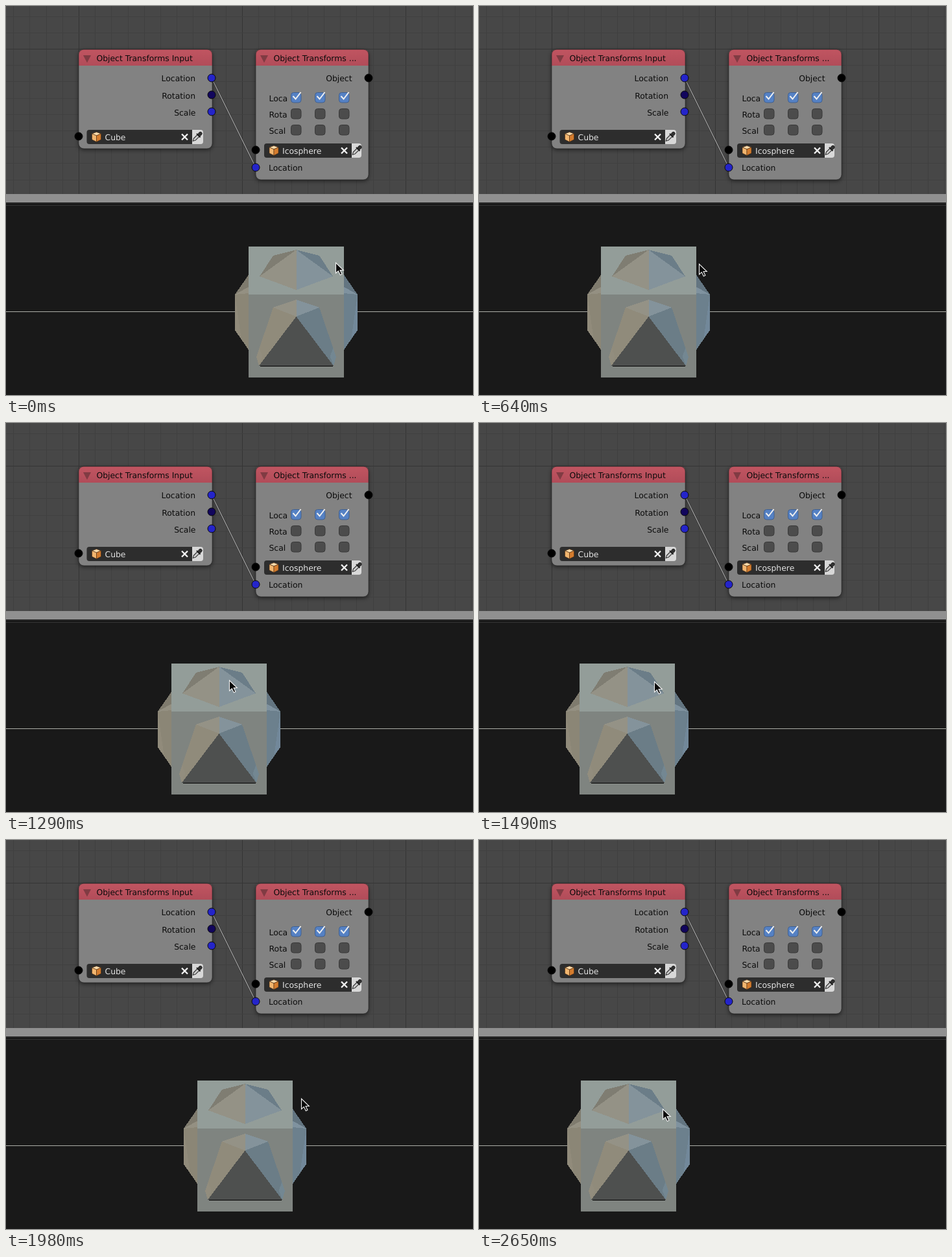
Write an HTML page that moves like this. It is 720 px wide and 600 px high and loops after 2750 ms.

```html
<!DOCTYPE html>
<html lang="en">
<head>
<meta charset="utf-8">
<title>Object transforms</title>
<style>
html, body { margin: 0; width: 100%; height: 100%; overflow: hidden; background: #191919; }
svg { display: block; width: 720px; height: 600px; }
text { font: 12.4px "DejaVu Sans", sans-serif; text-rendering: geometricPrecision; fill: #0b0b0b; }
.end { text-anchor: end; }
.field { fill: #e2e2e2; }
</style>
</head>
<body>
<svg id="stage" viewBox="0 0 720 600">
  <defs>
    <linearGradient id="head" x2="0" y2="1">
      <stop stop-color="#c15561"/><stop offset="1" stop-color="#b14c59"/>
    </linearGradient>
    <filter id="soft" x="-20%" y="-20%" width="140%" height="140%"><feGaussianBlur stdDeviation="3"/></filter>
  </defs>
  <rect width="720" height="290" fill="#474747"/>
  <g id="grid" shape-rendering="crispEdges"></g>
  <path d="M317 111L385 249" stroke="#2c2c2c" stroke-opacity=".5" stroke-width="2.6"/>
  <path d="M317 111L385 249" stroke="#bdbdbd"/>
  <g id="nodes"></g>
  <g shape-rendering="crispEdges">
    <rect y="290" width="720" height="310" fill="#191919"/>
    <rect y="290" width="720" height="13" fill="#909090"/>
    <rect y="303" width="720" height="3" fill="#222"/>
    <rect y="306" width="720" height="1" fill="#090909"/>
    <rect y="307" width="720" height="1" fill="#3b3b3b"/>
    <rect y="471" width="720" height="1" fill="#acada7"/>
    <g id="solid"></g>
  </g>
  <path id="pointer" d="M0 0V16L3.8 12.6L6.8 18.8L9.4 17.5L6.6 11.5H11.8Z"
        fill="#080808" stroke="#f2f2f2" stroke-width="1.1"/>
</svg>
<script>
const $ = id => document.getElementById(id);
const put = (id, markup) => $(id).insertAdjacentHTML('beforeend', markup);

// Node editor
function drawGrid() {
  const lines = (from, to, origin, path) => {
    for (let p = from; p < to; p += 25.2) {
      const major = Math.round((p - origin) / 25.2) % 10 === 0;
      put('grid', `<path d="${path(Math.round(p) + .5)}" stroke="${major ? '#353535' : '#404040'}"/>`);
    }
  };
  lines(112 - 25.2 * 4, 720, 112, p => `M${p} 0V290`);
  lines(66 - 25.2 * 2, 290, 66, p => `M0 ${p}H720`);
}

const text = (x, y, s, cls = '') => `<text x="${x}" y="${y}" class="${cls}">${s}</text>`;
const socket = (x, y, fill) => `<circle cx="${x}" cy="${y}" r="6" fill="${fill}" stroke="#080808"/>`;

const panel = (x, w, h, title) => `
  <rect x="${x}" y="69" width="${w}" height="${h}" rx="8" fill="#000" opacity=".55" filter="url(#soft)"/>
  <rect x="${x}" y="67" width="${w}" height="${h}" rx="8" fill="#828282"/>
  <path d="M${x} 92V75q0 -8 8 -8h${w - 16}q8 0 8 8V92Z" fill="url(#head)"/>
  <rect x="${x}" y="67" width="${w}" height="${h}" rx="8" fill="none" stroke="#272727" stroke-opacity=".6"/>
  <path d="M${x + 7} 76h12l-6 11.5Z" fill="#803b43"/>
  ${text(x + 27.4, 85, title)}`;

const cubeIcon = (x, y) => `<g transform="translate(${x} ${y})" stroke="#4b2c13" stroke-width=".6">
  <path d="M0 -7.5L7 -5L0 -2L-7 -5Z" fill="#ffdcab"/>
  <path d="M-7 -5L0 -2V7.5L-7 4Z" fill="#f2b66f"/>
  <path d="M7 -5L0 -2V7.5L7 4Z" fill="#d47c2e"/></g>`;

const cross = (x, y) => `<path d="M${x - 4.5} ${y - 4.5}l9 9m0 -9l-9 9" stroke="#f4f4f4" stroke-width="2.3"/>`;

const dropper = (x, y) => `<g transform="translate(${x} ${y}) rotate(45)" stroke="#222">
  <path d="M-2 -2V6L0 9.5L2 6V-2Z" fill="#c8c8c8"/>
  <rect x="-4" y="-3.5" width="8" height="2" fill="#222" stroke="none"/>
  <rect x="-2.3" y="-9" width="4.6" height="6" rx="2" fill="#333"/></g>`;

const picker = (x, y, w, tail, name) => `
  <path d="M${x + w} ${y}h${tail - 4}q4 0 4 4v14q0 4 -4 4h${4 - tail}Z" fill="#d8d8d8"/>
  <path d="M${x + w} ${y}H${x + 4}q-4 0 -4 4v14q0 4 4 4H${x + w}Z" fill="#2d2d2d"/>
  ${cubeIcon(x + 15, y + 11)}${text(x + 28, y + 16, name, 'field')}
  ${cross(x + w - 11.5, y + 11)}${dropper(x + w + 8, y + 10.5)}`;

const checkbox = (x, y, on) => `
  <rect x="${x + .5}" y="${y + .5}" width="15.5" height="15.5" rx="4"
        fill="${on ? '#5581c4' : '#4c4c4c'}" stroke="${on ? '#41608f' : '#393939'}"/>
  ${on ? `<path d="M${x + 3.5} ${y + 6}l4 4.5l8 -10.5" fill="none" stroke="#f0f0f0" stroke-width="2"/>` : ''}`;

function drawNodes() {
  const blue = '#2424c9', black = '#000';
  const boxes = ['Loca', 'Rota', 'Scal'].map((name, row) => {
    const y = [133, 158, 183][row];
    return text(405.5, y + 14, name) + [439, 476, 513].map(x => checkbox(x, y, row === 0)).join('');
  }).join('');

  put('nodes', panel(112, 206, 153, 'Object Transforms Input')
    + text(292, 116, 'Location', 'end') + text(292, 143, 'Rotation', 'end') + text(292.5, 169, 'Scale', 'end')
    + picker(124.5, 191, 162.5, 17, 'Cube')
    + socket(317, 111, blue) + socket(317, 137, '#12065c') + socket(317, 163, blue) + socket(112, 201, black)
    + panel(385, 174, 201, 'Object Transforms ...')
    + text(533.5, 116, 'Object', 'end') + boxes
    + picker(398, 212, 135, 15, 'Icosphere') + text(405, 254, 'Location')
    + socket(559, 111, black) + socket(385, 222, black) + socket(385, 249, blue));
}

// Solids: facets are mirrored around x = 0, [points, left colour, right colour]
const sides = [
  ['-73,414 -94.5,445 -94.5,500 -73,531', '#8b8676', '#6c808d'],
  ['-73,414 -94.5,445 -73,433', '#7f7b6e', '#637581'],
  ['-73,433 -94.5,445 -73,443', '#949082', '#7f929f'],
  ['-94.5,445 -94.5,500 -85,512', '#918b7b', '#72889a']
];
const faces = [
  ['-56.5,417 -35.5,385 0,376', '#7f7d72', '#6b7d88'],
  ['-56.5,417 0,376 0,438', '#949286', '#84939b'],
  ['-35.5,465 0,453 0,479', '#949286', '#84939b'],
  ['-35.5,465 -61.5,541 -57.5,555 0,479', '#908b7b', '#6b7d87'],
  ['-61.5,541 -57.5,555 -52,540 -57,528', '#928d7e', '#738792']
];

function drawSolid() {
  const facet = ([points, left, right]) =>
    `<polygon points="${points}" fill="${left}"/><polygon points="${points}" fill="${right}" transform="scale(-1 1)"/>`;
  put('solid', sides.map(facet).join('')
    + '<rect x="-73.5" y="371" width="147" height="74" fill="#939d99"/>'
    + '<rect x="-73.5" y="445" width="147" height="128" fill="#7f8480"/>'
    + faces.map(facet).join('')
    + '<polygon points="0,479 -57.5,555 57.5,555" fill="#4e504f"/>'
    + '<rect x="-55.5" y="555" width="112" height="1" fill="#000"/>');
}

// Motion: time, left edge of the solid, pointer x, pointer y
const keys = [
  [0, 353, 508, 396], [60, 347, 490, 396], [120, 318, 438, 397], [230, 237, 345, 399],
  [350, 146, 272, 400], [480, 107, 260, 400], [580, 132, 300, 399], [640, 167, 339, 398],
  [800, 246, 424, 397], [960, 315, 497, 397], [1040, 341, 501, 397], [1120, 344, 485, 397],
  [1210, 308, 420, 397], [1290, 234, 344, 397], [1400, 155, 280, 398], [1500, 122, 265, 399],
  [1660, 112, 285, 400], [1740, 159, 349, 399], [1880, 242, 428, 399], [2020, 307, 479, 400],
  [2190, 335, 488, 400], [2320, 335, 464, 401], [2400, 294, 402, 404], [2500, 207, 322, 409],
  [2650, 136, 283, 415]
];
const loop = 2750;

// Picture changes come in even runs: start, end, intervals
const runs = [[0, 60, 1], [60, 580, 10], [580, 640, 1], [640, 960, 6], [960, 1120, 4], [1120, 1170, 1],
  [1170, 1290, 3], [1290, 1660, 9], [1660, 1740, 2], [1740, 2190, 11], [2190, 2280, 1],
  [2280, 2320, 1], [2320, 2650, 8]];

function heldTime(t) {
  const run = runs.find(([a, b]) => t >= a && t < b);
  if (!run) return 2650;
  const [a, b, n] = run;
  const at = i => Math.round((a + (b - a) * i / n) / 10) * 10;
  let i = n - 1;
  while (at(i) > t) i--;
  return at(i);
}

// Smooth curve through the keys without overshoot
function slope(i, c) {
  if (i === 0 || i === keys.length - 1) return 0;
  const rate = j => (keys[j + 1][c] - keys[j][c]) / (keys[j + 1][0] - keys[j][0]);
  const a = rate(i - 1), b = rate(i);
  return a * b > 0 ? 2 * a * b / (a + b) : 0;
}

function valueAt(t, c) {
  const i = Math.max(0, Math.min(keys.length - 2, keys.findIndex(k => k[0] > t) - 1));
  if (t >= keys[keys.length - 1][0]) return keys[keys.length - 1][c];
  const h = keys[i + 1][0] - keys[i][0], u = (t - keys[i][0]) / h, v = 1 - u;
  return Math.round(v * v * (1 + 2 * u) * keys[i][c] + u * u * (3 - 2 * u) * keys[i + 1][c]
    + h * u * v * (v * slope(i, c) - u * slope(i + 1, c)));
}

function draw(t) {
  $('solid').setAttribute('transform', `translate(${valueAt(t, 1) + 94.5} 0)`);
  $('pointer').setAttribute('transform', `translate(${valueAt(t, 2) + .5} ${valueAt(t, 3)})`);
}

drawGrid();
drawNodes();
drawSolid();
draw(0);
const start = performance.now();
(function tick() {
  draw(heldTime((performance.now() - start) % loop));
  requestAnimationFrame(tick);
})();
</script>
</body>
</html>
```
